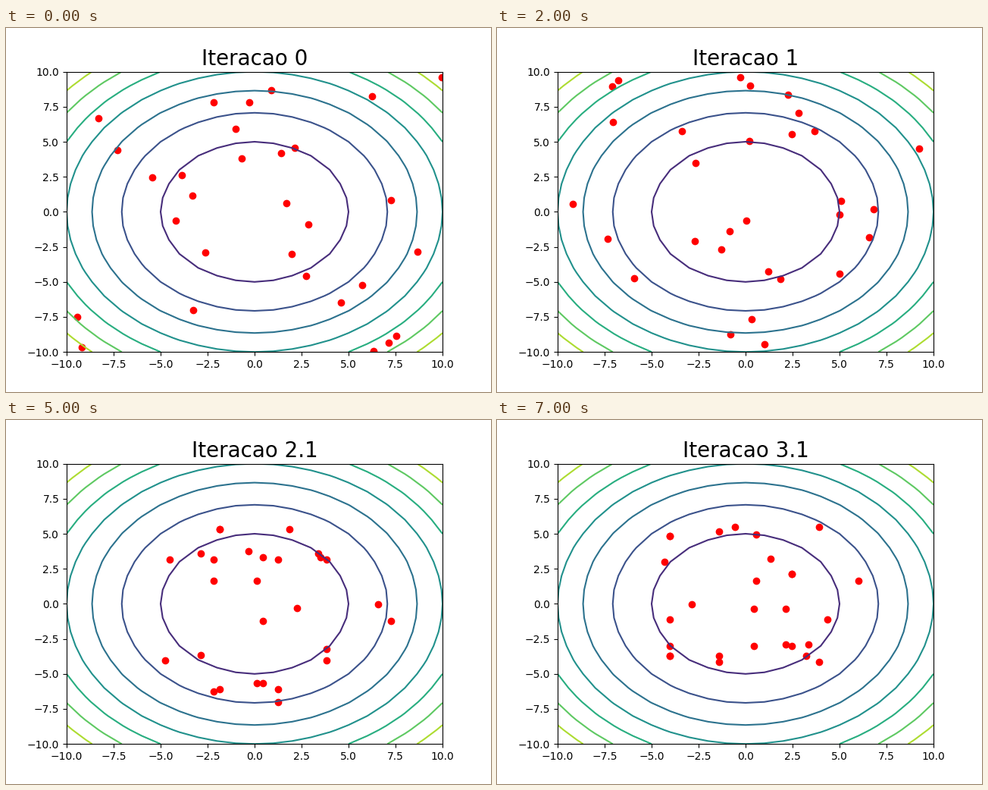
Recreate the animation shown at these times as a matplotlib script. Size 640x480 px, loop 8000 ms.

```python
import numpy as np
import matplotlib.pyplot as plt
from matplotlib.animation import FuncAnimation

SIZE, SURVIVORS, CHILDREN = 30, 16, 12
LIMIT, RING = 10, 5

# The fittest individuals of each generation, inside the innermost ring.
ELITES = [
    [(1.41, 4.19), (-0.69, 3.81), (-3.87, 2.62), (-3.31, 1.16), (-4.19, -0.63),
     (1.69, 0.62), (2.86, -0.90), (1.98, -3.01), (-2.62, -2.90)],
    [(-2.66, 3.48), (0.04, -0.63), (-0.85, -1.39), (-2.70, -2.09),
     (-1.29, -2.68), (1.21, -4.25), (5.00, -0.19)],
    [(3.39, 3.59), (3.51, 3.32), (-0.32, 3.76), (0.12, 1.65),
     (2.26, -0.30), (-2.86, -3.66)],
    [(0.56, 4.95), (1.33, 3.21), (2.46, 2.13), (2.14, -0.36), (-2.86, -0.03),
     (0.44, -3.01), (3.35, -2.90), (4.35, -1.11), (3.23, -3.71)],
]


def populate(elite, rng):
    """Fill the generation up with random individuals outside the ring."""
    field = rng.uniform(-LIMIT, LIMIT, (5 * SIZE, 2))
    outer = field[np.hypot(*field.T) > RING]
    return np.vstack([elite, outer[:SIZE - len(elite)]])


def breed(population, rng):
    """Keep the fittest; each child mixes the x and y of two of them."""
    order = np.argsort((population**2).sum(axis=1))
    best = population[order[:SURVIVORS]]
    mothers, fathers = rng.integers(SURVIVORS, size=(2, CHILDREN))
    children = np.column_stack([best[mothers, 0], best[fathers, 1]])
    return np.vstack([best, children])


steps = []
for n, elite in enumerate(ELITES):
    rng = np.random.default_rng(n)
    population = populate(elite, rng)
    bred = breed(population, rng) if n else population
    steps += [(f"Iteracao {n}", population), (f"Iteracao {n}.1", bred)]

fig, ax = plt.subplots(figsize=(6.4, 4.8), dpi=100)
axis = np.arange(-LIMIT, LIMIT + 1)
X, Y = np.meshgrid(axis, axis)
ax.contour(X, Y, X**2 + Y**2)
dots = ax.scatter([], [], c="red")
title = ax.set_title("", fontsize=20)
ax.set_xlim(-LIMIT, LIMIT)
ax.set_ylim(-LIMIT, LIMIT)


def update(i):
    label, population = steps[i]
    title.set_text(label)
    dots.set_offsets(population)
    return dots, title


anim = FuncAnimation(fig, update, frames=len(steps), interval=1000, repeat=True)
plt.show()
```
